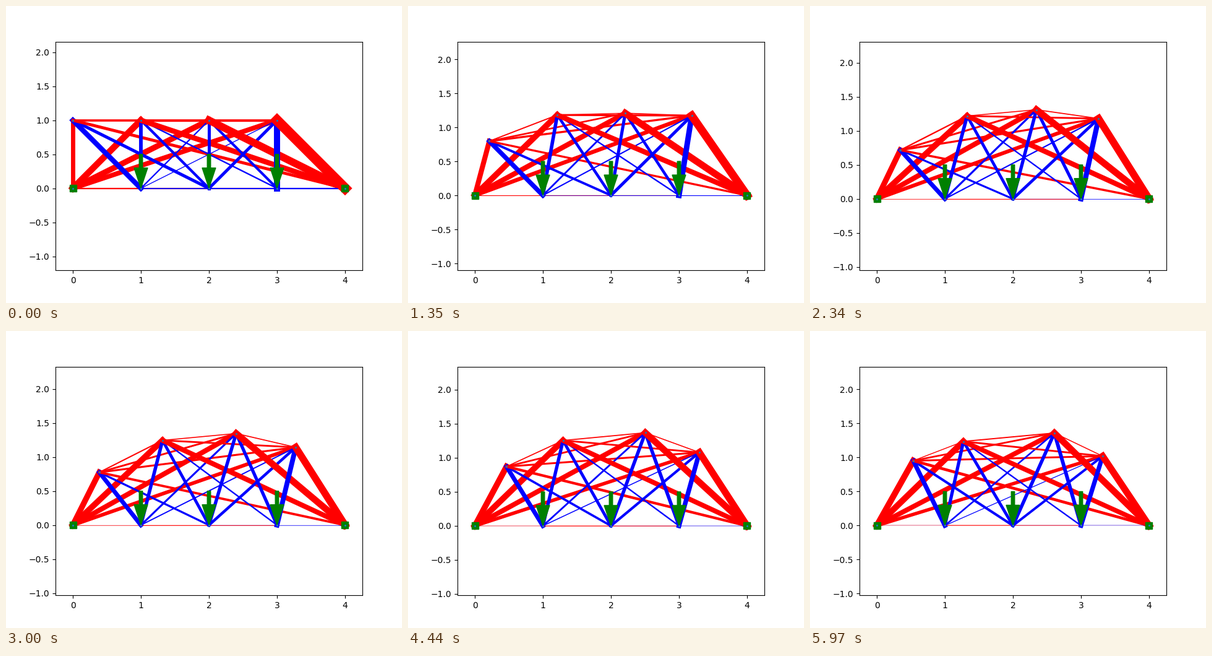
These frames come from a looping animation (640 by 480 pixels, 6000 ms). A matplotlib script:

```python
from itertools import combinations

import numpy as np
import matplotlib.pyplot as plt
from matplotlib.animation import FuncAnimation
from matplotlib.patches import Rectangle

FRAMES, INTERVAL = 200, 30

# Joints are numbered column by column: bottom even, top odd.
GRID = np.array([(n // 2, n % 2) for n in range(9)], dtype=float)
TOP = [1, 3, 5, 7]
SUPPORTS, LOADED = (0, 8), (2, 4, 6)
BARS = [p for p in combinations(range(9), 2) if p not in {(0, 8), (1, 6)}]
FREE = [d for n in range(9) if n not in SUPPORTS for d in (2 * n, 2 * n + 1)]

# Key shifts (dx, dy) of the four top joints away from the grid.
KEYS = {
    0: np.zeros((4, 2)),
    45: [(.213, -.204), (.212, .181), (.21, .207), (.187, .172)],
    78: [(.345, -.284), (.327, .218), (.345, .31), (.258, .18)],
    100: [(.389, -.225), (.318, .245), (.4, .346), (.275, .143)],
    199: [(.536, -.047), (.272, .236), (.609, .36), (.318, .02)],
}
TIMES = np.array(list(KEYS))
SHIFTS = np.array([KEYS[t] for t in KEYS], dtype=float)
SLOPES = np.gradient(SHIFTS, TIMES, axis=0)


def joints(t):
    """Joint positions at time t; top joints follow a cubic Hermite path."""
    k = min(np.searchsorted(TIMES, t, side="right") - 1, len(TIMES) - 2)
    h = TIMES[k + 1] - TIMES[k]
    s = (t - TIMES[k]) / h
    pts = GRID.copy()
    pts[TOP] += ((1 + 2 * s) * (1 - s) ** 2 * SHIFTS[k]
                 + s * (1 - s) ** 2 * h * SLOPES[k]
                 + s * s * (3 - 2 * s) * SHIFTS[k + 1]
                 + s * s * (s - 1) * h * SLOPES[k + 1])
    return pts


def bar_forces(pts):
    """Least-norm bar forces in equilibrium with unit loads; tension > 0."""
    eq = np.zeros((18, len(BARS)))
    for c, (i, j) in enumerate(BARS):
        d = pts[j] - pts[i]
        d = d / np.hypot(*d)
        eq[2 * i:2 * i + 2, c] = d
        eq[2 * j:2 * j + 2, c] = -d
    rhs = np.zeros(18)
    rhs[[2 * n + 1 for n in LOADED]] = 1
    return np.linalg.lstsq(eq[FREE], rhs[FREE], rcond=None)[0]


fig, ax = plt.subplots(figsize=(6.4, 4.8), dpi=100)
fig.subplots_adjust(left=.125, right=.9, bottom=.11, top=.88)
X0, X1 = -.255, 4.255
HALF = (X1 - X0) * 369.6 / 496 / 2  # equal scale on both axes
ax.set_xlim(X0, X1)

lines = [ax.plot([], [], solid_capstyle="projecting")[0] for _ in BARS]
for n in LOADED:
    ax.arrow(GRID[n, 0], .5, 0, -.2, width=.05, head_width=.2,
             head_length=.3, color="green", zorder=3)
for n in SUPPORTS:
    ax.add_patch(Rectangle(GRID[n] - .05, .1, .1, color="green", zorder=3))
dots, = ax.plot([], [], "o", color="C0", ms=1.3, zorder=4)


def update(t):
    pts = joints(t)
    for line, (i, j), f in zip(lines, BARS, bar_forces(pts)):
        line.set_data(pts[[i, j], 0], pts[[i, j], 1])
        line.set_linewidth(10 * abs(f))
        line.set_color("blue" if f > 0 else "red")
    dots.set_data(pts[:, 0], pts[:, 1])
    mid = (pts[:, 1].max() - .05) / 2
    ax.set_ylim(mid - HALF, mid + HALF)
    return lines + [dots]


anim = FuncAnimation(fig, update, frames=FRAMES, interval=INTERVAL,
                     init_func=lambda: update(0), repeat=True)
plt.show()
```
